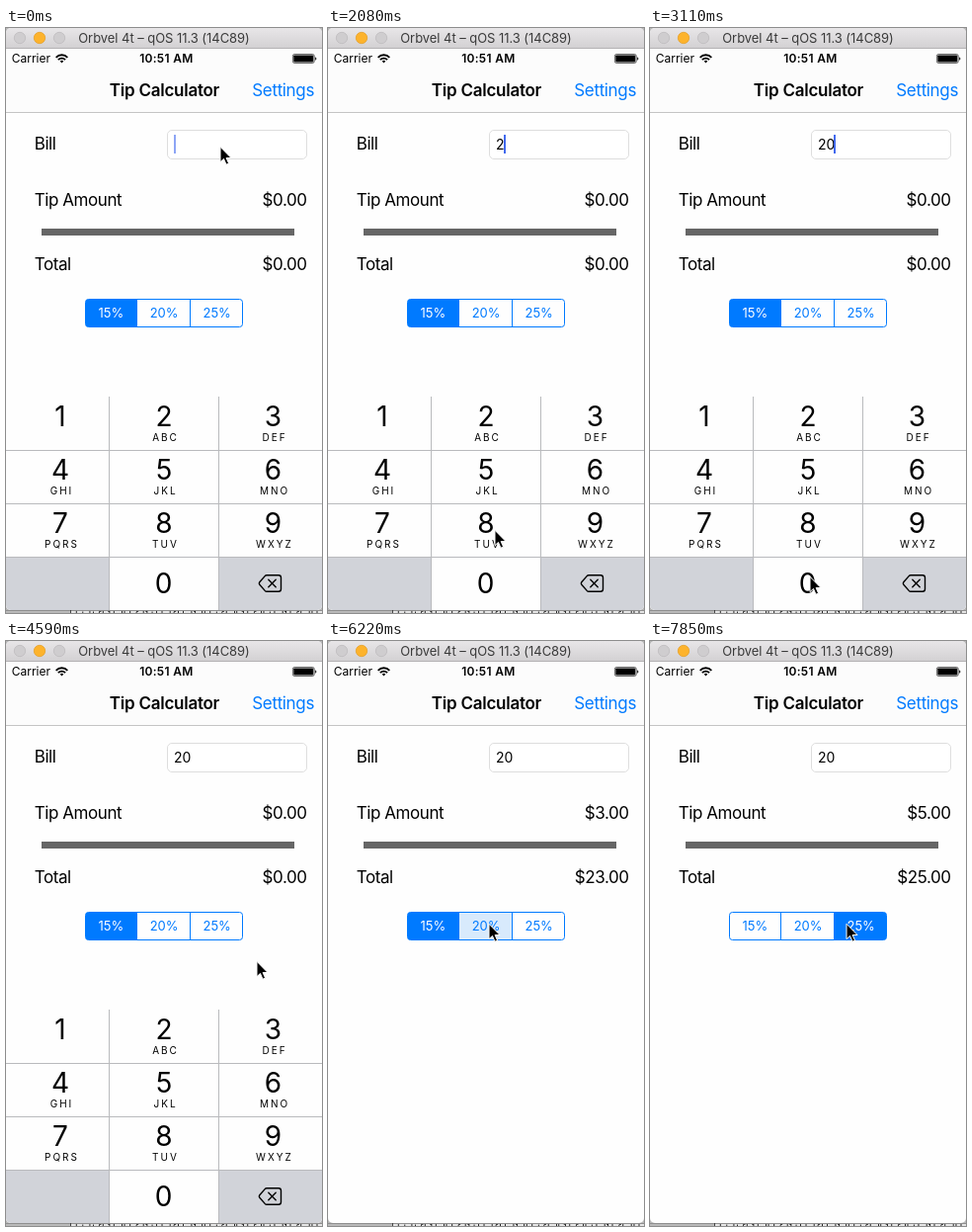
An HTML page that plays this animation: 320x592 px, repeating every 8 s.

```html
<!DOCTYPE html>
<html lang="en">
<head>
<meta charset="utf-8">
<title>Tip Calculator</title>
<style>
  html, body { margin: 0; width: 100%; height: 100%; overflow: hidden; background: #b9b9b9; }
  svg { display: block; width: 100vw; height: 100vh; }
  text { font-family: Inter, Roboto, sans-serif; font-size: 17px; letter-spacing: -.42px; white-space: pre; }
  .mid { text-anchor: middle; }
  .end { text-anchor: end; }
  .bold { font-weight: 600; }
  .title { letter-spacing: -.25px; }
  .link { letter-spacing: -.35px; fill: #007aff; }
  .bar { font-size: 13px; fill: #3a3a3a; letter-spacing: -.05px; }
  .status { font-size: 12px; letter-spacing: 0; }
  .clock { letter-spacing: .3px; }
  .field { font-size: 14px; letter-spacing: -.15px; }
  .seg { font-size: 13px; letter-spacing: -.05px; }
  .digit { font-size: 28px; letter-spacing: 0; }
  .letters { font-size: 10px; letter-spacing: 2px; }
  .behind { font: 9px "DejaVu Sans Mono", monospace; letter-spacing: 0; }
</style>
</head>
<body>
<svg viewBox="0 0 320 592">
  <defs>
    <linearGradient id="chrome" x2="0" y2="1">
      <stop stop-color="#e8e6e8"/><stop offset="1" stop-color="#d2d0d2"/>
    </linearGradient>
    <clipPath id="window"><rect width="320" height="589" rx="5"/></clipPath>
  </defs>

  <rect x="65" y="589" width="255" height="3" fill="#e4e4e4"/>
  <path d="M0 589.5H320" stroke="#8f8f8f"/>
  <path d="M65.5 589V592" stroke="#444"/>
  <text class="behind" x="70" y="597">btdtfblhdbkfdltbhdfkbdldhbtfkdblhfdbtkdlbfhdkbtdl</text>

  <g clip-path="url(#window)">
    <rect width="320" height="589" fill="#fefefe"/>
    <rect width="320" height="21" fill="url(#chrome)"/>
    <path d="M0 20.5H320" stroke="#b4b2b4"/>
    <g fill="#cfcdcf" stroke="#bebcbe" stroke-width=".8">
      <circle cx="14" cy="10" r="5.7"/>
      <circle cx="34" cy="10" r="5.7" fill="#fdb32c" stroke="#e5a02a"/>
      <circle cx="54" cy="10" r="5.7"/>
    </g>
    <text class="bar mid" x="160" y="15">Orbvel 4t – qOS 11.3 (14C89)</text>

    <rect y="21" width="320" height="64" fill="#fcfcfc"/>
    <path d="M0 85.5H320" stroke="#c4c4c4"/>
    <text class="status" x="5.7" y="35">Carrier</text>
    <g fill="none" stroke="#000" stroke-width="1.9">
      <path d="M50.7 29.8a8 8 0 0 1 11.6 0M52.9 32.2a5 5 0 0 1 7.2 0"/>
      <path d="M56.5 35.6l-1.8-2a2.6 2.6 0 0 1 3.6 0z" fill="#000" stroke="none"/>
    </g>
    <text class="status clock bold mid" x="162.4" y="35">10:51 AM</text>
    <rect x="290.4" y="26.5" width="21.8" height="9" rx="1.8" fill="none" stroke="#000" stroke-width=".6"/>
    <rect x="291.3" y="27.4" width="20" height="7.2" rx=".8"/>
    <path d="M313.2 29.2q2.4 1.8 0 3.6z"/>
    <text class="title bold mid" x="160.5" y="69">Tip Calculator</text>
    <text class="link end" x="312" y="69">Settings</text>

    <text x="28.7" y="122.5">Bill</text>
    <rect x="163.5" y="103.5" width="141" height="29" rx="4.5" fill="#fff" stroke="#dedede"/>
    <text class="field" id="bill" x="170" y="122.5"></text>
    <rect id="caret" y="108" width="2" height="19" fill="#4269ee"/>
    <text x="28.7" y="179.5">Tip Amount</text>
    <text class="end" id="tip" x="304.6" y="179.5"></text>
    <rect x="36" y="203" width="256" height="7" fill="#666"/>
    <text x="28.7" y="244.5">Total</text>
    <text class="end" id="total" x="304.6" y="244.5"></text>

    <g id="segments" style="clip-path: inset(0 round 3px)"></g>
    <g fill="none" stroke="#007aff">
      <rect x="80.5" y="274.5" width="159" height="28" rx="3"/>
      <path d="M132.5 274V303M186.5 274V303"/>
    </g>
    <g id="keyboard"></g>
  </g>
  <path id="cursor" d="M0 -.7V14.6L3.5 11.4 6 17.2 8.6 16.1 6.1 10.5H11Z" stroke="#fff" stroke-width="1" stroke-linejoin="round"/>
</svg>
<script>
const $ = id => document.getElementById(id);

function add(parent, tag, attrs, text = "") {
  const el = document.createElementNS("http://www.w3.org/2000/svg", tag);
  for (const name in attrs) el.setAttribute(name, attrs[name]);
  el.textContent = text;
  return parent.appendChild(el);
}

// Segmented control
const RATES = [15, 20, 25];
const edges = [80.5, 132.5, 186.5, 239.5];
const segments = RATES.map((rate, i) => ({
  fill: add($("segments"), "rect", {
    x: edges[i], y: 274.5, width: edges[i + 1] - edges[i], height: 28
  }),
  label: add($("segments"), "text", { class: "seg mid", x: [106.4, 160, 213.7][i], y: 293.3 }, rate + "%")
}));

// Number pad
const keyboard = $("keyboard");
const LETTERS = ["", "ABC", "DEF", "GHI", "JKL", "MNO", "PQRS", "TUV", "WXYZ"];
const centers = [55, 160, 270.5];
const KEY_GRAY = "#d1d3d9";
add(keyboard, "rect", { y: 373, width: 320, height: 216, fill: "#fefefe" });
for (const x of [0, 215]) add(keyboard, "rect", { x, y: 535, width: 105, height: 54, fill: KEY_GRAY });
const pressedKey = add(keyboard, "rect", { x: 105, width: 110, height: 54, fill: KEY_GRAY });
add(keyboard, "path", {
  d: "M0 427.5H320M0 481.5H320M0 535.5H320M104.5 373V589M215.5 373V589", stroke: "#b9babd"
});
LETTERS.forEach((letters, i) => {
  const x = centers[i % 3], y = 403 + 54 * Math.floor(i / 3);
  add(keyboard, "text", { class: "digit mid", x, y }, i + 1);
  add(keyboard, "text", { class: "letters mid", x: x + 1.5, y: y + 15 }, letters);
});
add(keyboard, "text", { class: "digit mid", x: 159.5, y: 572 }, "0");
add(keyboard, "path", {
  d: "M264 553.8H276q2.5 0 2.5 2.5V567.7q0 2.5-2.5 2.5H264q-1 0-1.8-.8L256.8 563.2q-1-1.2 0-2.4L262.2 554.6q.8-.8 1.8-.8ZM265.8 558.3l7.4 7.4M273.2 558.3l-7.4 7.4",
  fill: "none", stroke: "#000", "stroke-width": 1.4, "stroke-linejoin": "round", "stroke-linecap": "round"
});

// The screen advances in equal ticks; all times below are in ticks.
const LOOP = 8000, TICKS = 54;
const TYPE_2 = 11, TYPE_0 = 21, DISMISS = 34, PICK_20 = 43, PICK_25 = 51;
const PATH = [ // tick, x, y
  [2, 217, 121], [3, 240, 150], [4, 257, 218], [5, 232, 290], [6, 175, 350], [7, 139, 386],
  [8, 154, 394], [12, 154, 394], [13, 163, 452], [14, 169, 509], [15, 168, 538], [17, 164, 554],
  [20, 162, 556], [21, 162, 556], [23, 167, 535], [26, 200, 410], [28, 222, 342],
  [31, 254, 325], [35, 254, 325], [38, 208, 302], [41, 163, 287], [43, 163, 287],
  [48, 201, 286], [51, 201, 286], [53, 199, 287]
];

function cursorAt(tick) {
  const next = PATH.findIndex(p => p[0] > tick);
  if (next < 0) return PATH.at(-1).slice(1);
  if (!next) return PATH[0].slice(1);
  const [t0, x0, y0] = PATH[next - 1], [t1, x1, y1] = PATH[next];
  const k = (tick - t0) / (t1 - t0);
  return [x0 + (x1 - x0) * k, y0 + (y1 - y0) * k].map(Math.round);
}

function caretOpacity(tick) {
  if (tick === 0) return .6;
  if (tick >= DISMISS) return 0;
  const restart = tick >= TYPE_0 ? TYPE_0 : tick >= TYPE_2 ? TYPE_2 : -3;
  return (tick - restart) % 6.75 < 3.2 ? 1 : 0;
}

function render(ms) {
  const tick = Math.floor((ms % LOOP + 9) * TICKS / LOOP) % TICKS;

  const bill = tick >= TYPE_0 ? "20" : tick >= TYPE_2 ? "2" : "";
  $("bill").textContent = bill;
  $("caret").setAttribute("x", 170 + bill.length * 8);
  $("caret").setAttribute("opacity", caretOpacity(tick));

  const selected = tick >= PICK_25 ? 2 : tick >= PICK_20 ? 1 : 0;
  const touched = tick === PICK_20 - 1 ? 1 : tick === PICK_25 - 1 ? 2 : -1;
  segments.forEach(({ fill, label }, i) => {
    fill.setAttribute("fill", i === selected ? "#007aff" : i === touched ? "#d8eafc" : "#fefefe");
    label.setAttribute("fill", i === selected ? "#fff" : "#007aff");
  });

  const amount = tick >= DISMISS ? 20 : 0;
  const tip = amount * RATES[selected] / 100;
  $("tip").textContent = "$" + tip.toFixed(2);
  $("total").textContent = "$" + (amount + tip).toFixed(2);

  const pressedY = tick === TYPE_2 - 1 ? 373 : tick === TYPE_0 - 1 ? 535 : null;
  pressedKey.setAttribute("visibility", pressedY === null ? "hidden" : "inherit");
  pressedKey.setAttribute("y", pressedY ?? 0);
  const hide = Math.min(1, Math.max(0, (tick - DISMISS + .5) / 2));
  const slide = hide * hide * (3 - 2 * hide);
  keyboard.setAttribute("transform", `translate(0 ${216 * slide})`);
  keyboard.setAttribute("visibility", slide < 1 ? "visible" : "hidden");

  $("cursor").setAttribute("transform", `translate(${cursorAt(tick)})`);
}

const start = performance.now();
(function frame() {
  render(performance.now() - start);
  requestAnimationFrame(frame);
})();
</script>
</body>
</html>
```
